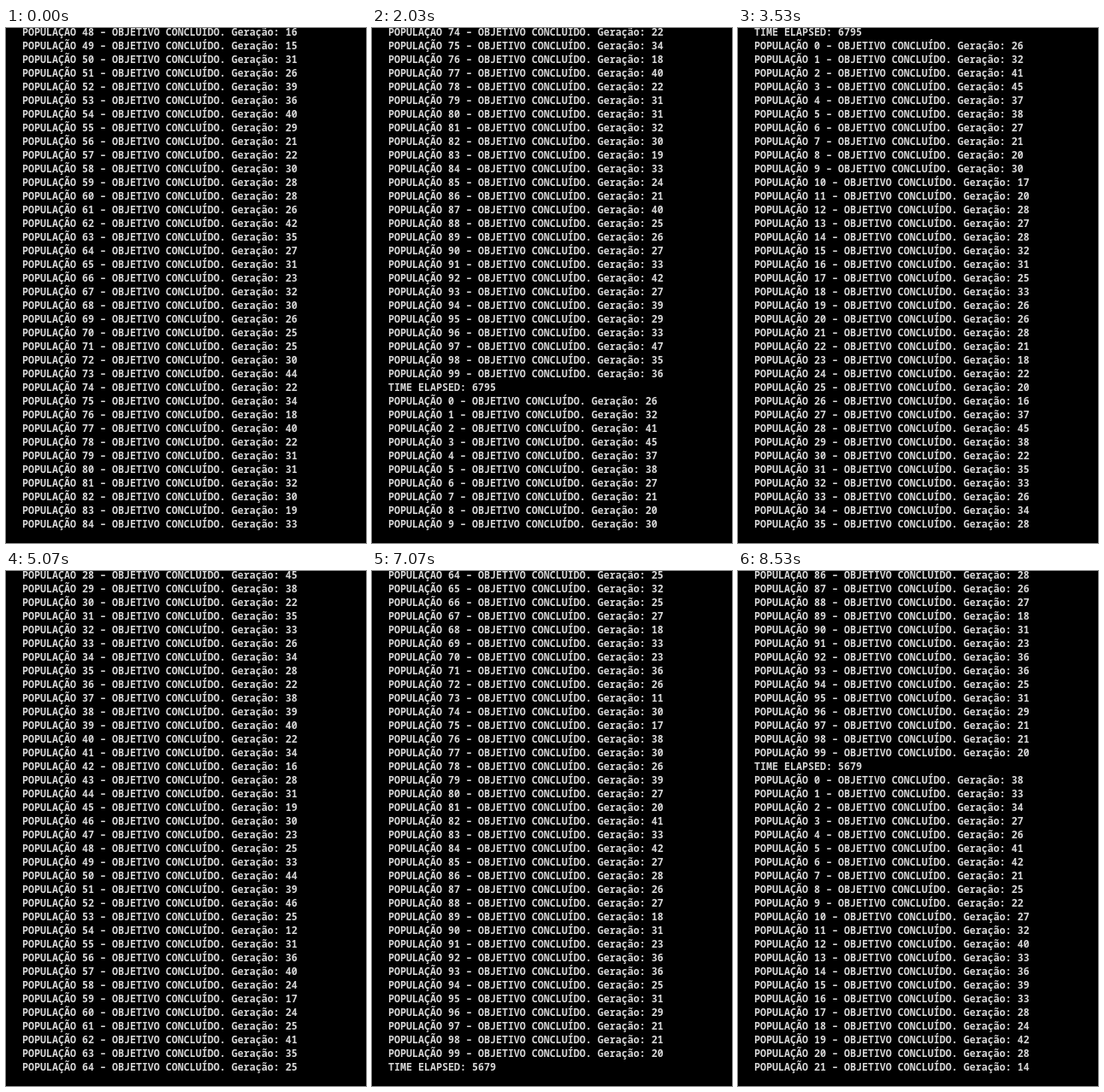
An HTML page for the animation above (8710 ms loop, 421x603 px).

```html
<!DOCTYPE html>
<html lang="pt">
<head>
<meta charset="utf-8">
<style>
  html, body { margin: 0; width: 100%; height: 100%; overflow: hidden; background: #000; }
  pre {
    position: absolute; left: 19px; top: -3px; margin: 0;
    color: #d8d8d8;
    font: bold 11.667px/16px "Noto Sans Mono", monospace;
  }
</style>
</head>
<body>
<pre id="log"></pre>
<script>
const LOOP = 8710, ROWS = 37;

let seed = 48;
const random = () => (seed = seed * 16807 % 2147483647) / 2147483647;

const lines = [];
function addRun(first, last, elapsed) {
  for (let n = first; n <= last; n++) {
    const generation = 10 + Math.floor((random() + random()) * 20);
    lines.push(`POPULAÇÃO ${n} – OBJETIVO CONCLUÍDO. Geração: ${generation}`);
  }
  if (elapsed) lines.push(`TIME ELAPSED: ${elapsed}`);
}
addRun(48, 99, 6795);
addRun(0, 99, 5679);
addRun(0, 21);

// Refresh rhythm: [start, interval] in ms
const rhythm = [[0, 370], [730, 250], [1480, 550], [2030, 250]];

// Scroll speed: [time in ms, first visible line], linear in between
const scroll = [[0, 0], [1230, 17], [2780, 35], [3530, 52], [5030, 81], [7030, 117], [8530, 139]];

function lastRefresh(t) {
  const [start, interval] = rhythm.findLast(([from]) => from <= t);
  return t - (t - start) % interval;
}

function firstLine(t) {
  const i = scroll.findLastIndex(([time]) => time <= t);
  const [t0, line0] = scroll[i];
  const [t1, line1] = scroll[i + 1] ?? [LOOP, line0];
  return Math.round(line0 + (line1 - line0) * (t - t0) / (t1 - t0));
}

const log = document.getElementById("log");
const start = performance.now();
let shown = -1;

function draw() {
  const t = (performance.now() - start) % LOOP;
  const top = firstLine(lastRefresh(t) + 0.01);
  if (top !== shown) {
    log.textContent = lines.slice(top, top + ROWS).join("\n");
    shown = top;
  }
  requestAnimationFrame(draw);
}
draw();
</script>
</body>
</html>
```
